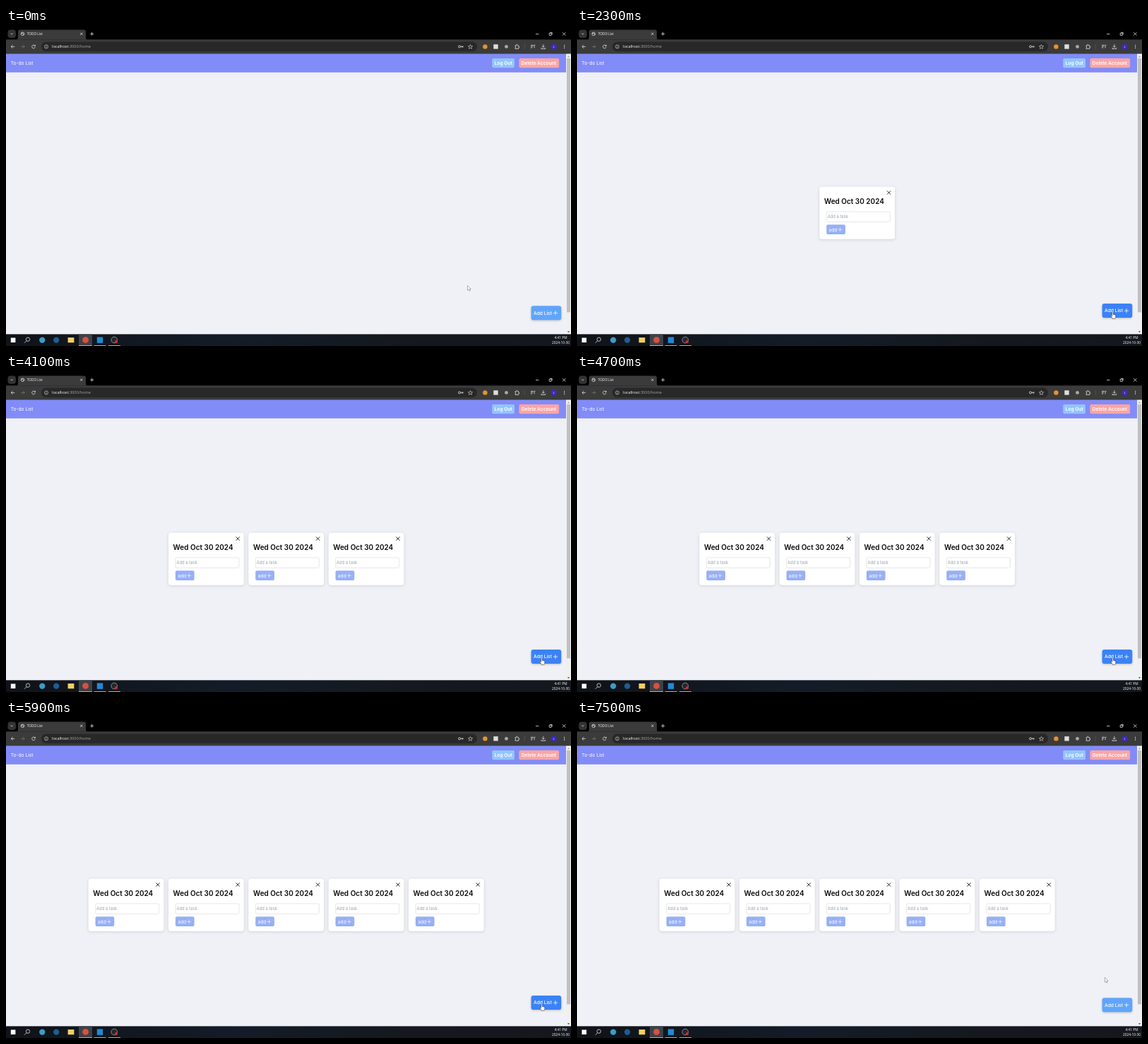
An HTML page that plays this animation: 800 by 450 pixels, repeating every 8000 ms.

```html
<!DOCTYPE html>
<html lang="en">
<head>
<meta charset="utf-8">
<title>To-do List</title>
<style>
html, body { margin: 0; width: 100%; height: 100%; overflow: hidden; background: #f0f1f6; }
svg { display: block; width: 800px; height: 450px; }
text { font: 6.67px Inter, sans-serif; fill: #fff; white-space: pre; }
.ui text { font-family: "Open Sans", "Noto Sans", sans-serif; }
.line { fill: none; stroke: #e3e3e3; stroke-width: .8; }
.card { filter: drop-shadow(0 1.8px 2px rgba(0, 0, 0, .13)); }
#add { filter: drop-shadow(0 1.5px 1.5px rgba(0, 0, 0, .22)); }
.semi { font-weight: 600; }
.mid { font-weight: 500; }
</style>
</head>
<body>
<svg viewBox="0 0 800 450">
  <defs>
    <linearGradient id="bar">
      <stop offset="0" stop-color="#101318"/>
      <stop offset=".4" stop-color="#131c28"/>
      <stop offset=".7" stop-color="#15191f"/>
      <stop offset="1" stop-color="#14181e"/>
    </linearGradient>
    <g id="card">
      <rect class="card" width="106.7" height="74" rx="3.4" fill="#fff"/>
      <path d="M95.6 5.7l5.2 5.2m0-5.2l-5.2 5.2" stroke="#111" stroke-width=".9"/>
      <text class="semi" x="6.6" y="24.8" style="font-size:10px;fill:#0a0a0a">Wed Oct 30 2024</text>
      <rect x="10" y="35.2" width="90" height="14.4" rx="2" fill="#fff" stroke="#d3d5de" stroke-width=".6"/>
      <text x="11.4" y="44.6" style="font-size:5.83px;fill:#9ca3af">Add a task</text>
      <rect x="9.9" y="53.5" width="26.7" height="13.8" rx="2" fill="#96aff6"/>
      <text x="13.2" y="63">add</text>
      <path d="M26.2 60.6h6m-3-3v6" stroke="#fff" stroke-width=".6"/>
    </g>
  </defs>

  <!-- page -->
  <rect y="36" width="800" height="398" fill="#f0f1f6"/>
  <rect y="36" width="793" height="26.8" fill="#818cf8"/>
  <text x="6.7" y="52">To-do List</text>
  <rect x="688.3" y="43" width="31.7" height="13.3" rx="2" fill="#93c5fd"/>
  <text class="semi" x="691.6" y="52">Log Out</text>
  <rect x="726.5" y="43" width="56.6" height="13.3" rx="2" fill="#fca5a5"/>
  <text class="semi" x="729.8" y="52">Delete Account</text>
  <g id="cards"></g>
  <g id="add">
    <rect id="face" x="743.6" y="393.2" width="42.6" height="20" rx="3"/>
    <text class="mid" x="747" y="405.7">Add List</text>
    <path d="M774.8 403.3h6.4m-3.2-3.2v6.4" stroke="#fff" stroke-width=".75"/>
  </g>
  <rect x="793" y="36" width="7" height="398" fill="#f0f0f1"/>
  <rect x="794" y="43" width="5" height="359.3" fill="#c0c0c1"/>
  <path d="M794.9 41.2l1.6-2 1.6 2z" fill="#a0a0a0"/>
  <path d="M794.9 428.9l1.6 2 1.6-2z" fill="#505050"/>

  <!-- browser frame -->
  <g class="ui">
    <rect width="800" height="17" fill="#000"/>
    <rect y="16.3" width="800" height="20.2" fill="#3b3b3b"/>
    <path d="M14 16.5q3 0 3-3v-8q0-3 3-3h90q3 0 3 3v8q0 3 3 3z" fill="#3b3b3b"/>
    <rect x="2.5" y="2.5" width="11.5" height="11.5" rx="4" fill="#333"/>
    <rect x="50" y="19.6" width="617" height="13.6" rx="6.8" fill="#282828"/>
    <g class="line">
      <path d="M6.6 7.5l1.6 1.6 1.6-1.6M105.2 6.7l3.2 3.2m0-3.2l-3.2 3.2M119.2 8.3h5m-2.5-2.5v5"/>
      <circle cx="23.5" cy="8.3" r="2.3"/>
      <path d="M21.5 7.5h2l.6 1.2 1.6.4"/>
      <path d="M750 8.6h4.4M769.2 7.3h3v3h-3zm1-1h3v3M788 6.2l4.4 4.4m0-4.4l-4.4 4.4"/>
      <path d="M12.2 26.4H7.2m2.3-2.3l-2.3 2.3 2.3 2.3"/>
      <path d="M21.2 26.4h5m-2.3-2.3l2.3 2.3-2.3 2.3" stroke="#777"/>
      <path d="M41 25.3a2.3 2.3 0 1 0 .2 1.8M41.4 23.8v1.7h-1.7"/>
      <circle cx="57" cy="26.4" r="2.5" stroke-width=".6"/>
      <path d="M57 26v1.7m0-3v.7" stroke-width=".6"/>
      <circle cx="642" cy="26.4" r="1.5"/>
      <path d="M643.5 26.1h4.3m-1.2 0v1.6m-1.5-1.6v1.2"/>
      <path d="M657.5 23.5l.9 2 2.2.2-1.7 1.5.5 2.1-1.9-1.1-1.9 1.1.5-2.1-1.7-1.5 2.2-.2z" stroke-width=".6"/>
      <path d="M721 24.7h1.5v-.5a.8.8 0 0 1 1.6 0v.5h1.6v1.5h.4a.8.8 0 0 1 0 1.6h-.4v1.5h-4.7v-1.6a.8.8 0 0 0 0-1.6z"/>
      <path d="M734.2 23v7" stroke="#666" stroke-width=".5"/>
      <path d="M743 24.4h4m-4 1.8h3m-3 1.8h2m3 .3v-4h1.4"/>
      <path d="M760.8 23.2v4m-1.8-1.6l1.8 1.8 1.8-1.8M758 27.8v1.6h5.6v-1.6"/>
    </g>
    <text x="29.7" y="10.1" style="font-size:4.75px">TODO List</text>
    <text x="65" y="28.4" style="font-size:5.6px">localhost<tspan fill="#a5a5a5">:3000/home</tspan></text>
    <circle cx="678.4" cy="26.4" r="3.2" fill="#e8922e"/>
    <rect x="690.3" y="23.2" width="6.4" height="6.4" fill="#dedede"/>
    <circle cx="708.5" cy="26.4" r="2.4" fill="#aaa"/>
    <circle cx="775.7" cy="26.4" r="4.2" fill="#3d2bb8"/>
    <text x="775.7" y="28" text-anchor="middle" style="font-size:4.2px">L</text>
    <g fill="#e3e3e3">
      <circle cx="790.6" cy="24.4" r=".6"/>
      <circle cx="790.6" cy="26.4" r=".6"/>
      <circle cx="790.6" cy="28.4" r=".6"/>
    </g>

    <!-- taskbar -->
    <rect y="433.3" width="800" height="17" fill="url(#bar)"/>
    <rect x="103" y="433.3" width="19" height="17" fill="#3c4249"/>
    <rect x="6.8" y="438.4" width="6.6" height="6.6" fill="#fff"/>
    <g class="line" stroke-width="1">
      <circle cx="31" cy="440.6" r="2.7"/>
      <path d="M29 442.7l-3 3"/>
    </g>
    <circle cx="51.3" cy="441.6" r="4.2" fill="#3f9bc4"/>
    <circle cx="71.2" cy="441.6" r="4.2" fill="#1f5d94"/>
    <rect x="87.6" y="438" width="8.8" height="7.2" fill="#f5cf62"/>
    <circle cx="112.6" cy="441.4" r="4.4" fill="#d9503f"/>
    <rect x="128.8" y="437.4" width="8.4" height="8.4" fill="#2389d6"/>
    <circle cx="153.2" cy="441.4" r="4.3" fill="#25272b" stroke="#c9c9c9" stroke-width=".6"/>
    <circle cx="156" cy="444" r="2.1" fill="#e0262b"/>
    <path d="M103 449.5h19m2.5 0h17m3.5 0h17" stroke="#7fb5e2"/>
    <text x="785.5" y="439.6" text-anchor="middle" style="font-size:4.8px">4:41 PM</text>
    <text x="785.5" y="447.3" text-anchor="middle" style="font-size:4.8px">2024-10-30</text>
  </g>

  <!-- pointers, tip at the origin -->
  <path id="arrow" d="M0 0v6.7l1.6-1.4 1.1 2.5 1.1-.5-1.1-2.4h2.1z" fill="#fff" stroke="#555" stroke-width=".45"/>
  <path id="hand" d="M-.8.7q.8-1.4 1.6 0v2.8l2.6.6q.9.3.9 1.2v1.7q-.2 1-.8 1.8v.8h-3.9v-.8l-2.2-3q-.4-1 .6-1l1.2.9z" fill="#fff" stroke="#222" stroke-width=".5"/>
</svg>
<script>
const $ = id => document.getElementById(id);
const LOOP = 8000, PITCH = 113.33;
const clicks = [1900, 2800, 3700, 4700, 5900];
// time, x, y of the pointer tip
const path = [
  [0, 653.5, 364.5], [100, 655, 365], [350, 709, 384], [600, 750, 400], [800, 759.5, 405.5],
  [900, 760, 405.5], [1200, 758.5, 401.8], [6200, 758.5, 401.8], [6600, 751.3, 393.2],
  [6800, 748.5, 377], [7000, 747.3, 364.3], [LOOP, 747.3, 364.3]
];
const clamp = v => Math.max(0, Math.min(1, v));
const smooth = v => { v = clamp(v); return v * v * (3 - 2 * v); };
const mix = (a, b, k) => a + (b - a) * k;

function pointer(t) {
  const i = path.findIndex(p => p[0] > t);
  const a = path[i - 1], b = path[i], k = (t - a[0]) / (b[0] - a[0]);
  return [mix(a[1], b[1], k), mix(a[2], b[2], k)];
}

let shown = -1;
function showCards(n) {
  if (n === shown) return;
  shown = n;
  const left = 396.67 - (n * PITCH - 6.67) / 2;
  $("cards").innerHTML = Array.from({ length: n }, (_, i) =>
    `<use href="#card" x="${left + i * PITCH}" y="224.7"/>`).join("");
}

function draw(now) {
  const t = Math.floor(now % LOOP / 100) * 100;
  showCards(clicks.filter(c => c <= t).length);

  const hover = smooth((t - 550) / 200) - smooth((t - 6650) / 250);
  const rgb = [[96, 59], [165, 130], [250, 246]].map(([a, b]) => mix(a, b, hover));
  $("face").setAttribute("fill", `rgb(${rgb.map(Math.round)})`);
  $("add").setAttribute("transform", `translate(0 ${-3.2 * hover})`);

  const [x, y] = pointer(t), over = t >= 600 && t < 6700;
  for (const id of ["arrow", "hand"]) {
    $(id).setAttribute("transform", `translate(${x} ${y})`);
    $(id).setAttribute("visibility", (id === "hand") === over ? "visible" : "hidden");
  }
  requestAnimationFrame(draw);
}
draw(performance.now());
</script>
</body>
</html>
```
